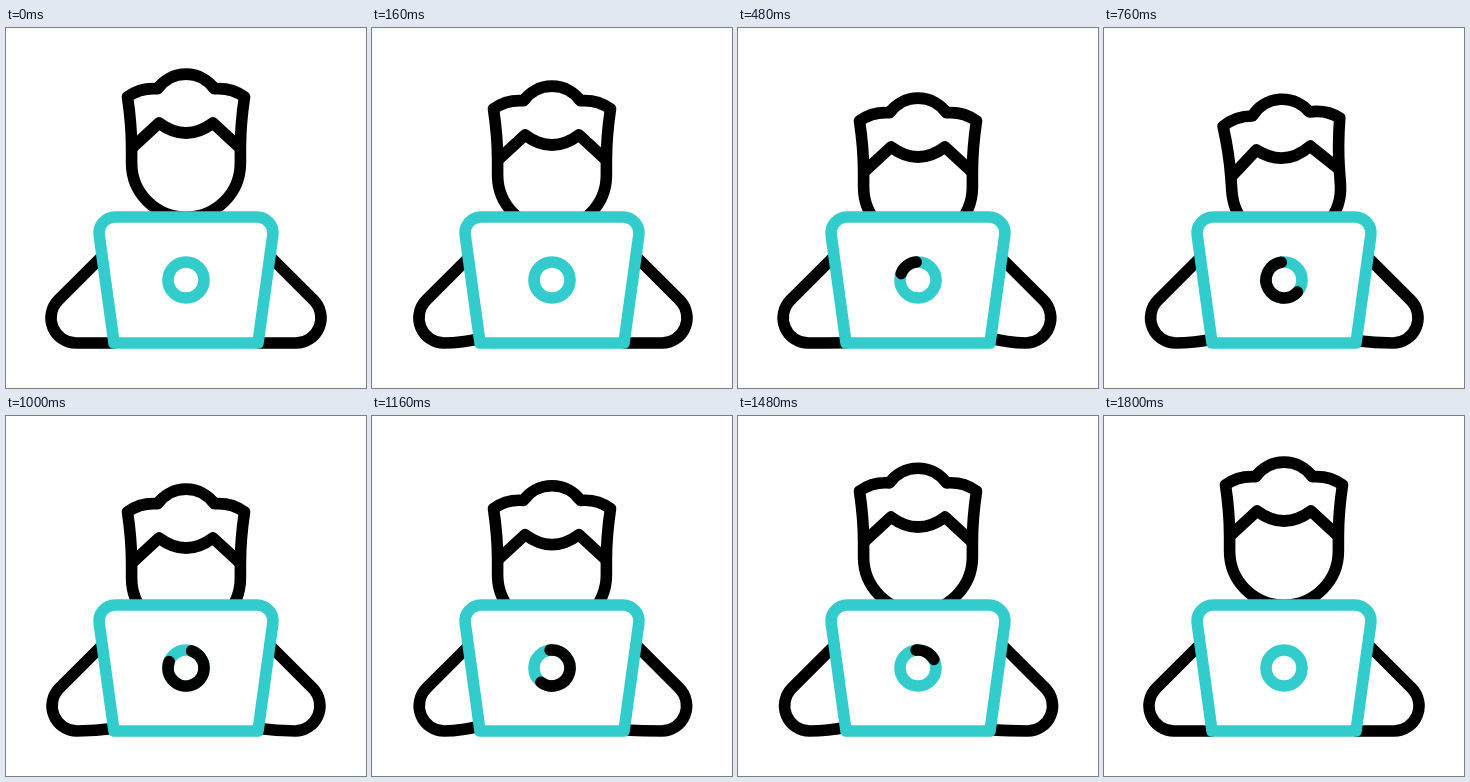
Animation, 360 px wide and 360 px high, one loop 2 s. Source, as an HTML page:

```html
<!DOCTYPE html>
<html lang="en">
<head>
<meta charset="utf-8">
<title>Person at laptop</title>
<style>
  html, body { margin: 0; width: 100%; height: 100%; overflow: hidden; background: #fff; }
  svg { display: block; width: 100%; height: 100%; }
</style>
</head>
<body>
<svg viewBox="0 0 360 360" fill="none" stroke="#000" stroke-width="11.6" stroke-linecap="round" stroke-linejoin="round">
  <path id="leftArm"/>
  <path id="rightArm" transform="translate(360 0) scale(-1 1)"/>
  <g id="head">
    <path d="M121.500 69C131 62 141 60 151.500 60.800A35 35 0 0 1 208.500 60.800C219 60 229 62 238.500 69C236 86 234.400 103 234.400 120V135A54.400 54.400 0 0 1 125.600 135V120C125.600 103 124 86 121.500 69Z"/>
    <path d="M127 119L153 95Q180 115 207 95L233 119"/>
  </g>
  <g stroke="#33cccc">
    <path fill="#fff" d="M108 315L93.200 207.200A16 16 0 0 1 109 189H251A16 16 0 0 1 266.800 207.200L252 315Z"/>
    <circle cx="180" cy="252" r="18"/>
  </g>
  <path id="arc"/>
</svg>
<script>
const LOOP = 2000, STEP = 40, END = 1800;
const part = id => document.getElementById(id);
const head = part('head'), leftArm = part('leftArm'), rightArm = part('rightArm'), arc = part('arc');

const progress = (t, start, length) => Math.min(1, Math.max(0, (t - start) / length));
const ease = u => (1 - Math.cos(Math.PI * u)) / 2;
const easeOut = u => Math.sin(Math.PI * u / 2);
const humps = (t, start, length, count) =>
  Math.sin(Math.PI * count * progress(t, start, length * count)) ** 2;

// Bending pulls the elbow inwards and lifts the hand behind the laptop.
function bendArm(arm, bend) {
  const x = 2.4 * bend, hand = 315 - 6 * bend;
  arm.setAttribute('d', `M${108 + x} ${hand}Q${88 + x} 315 ${70 + x} 315` +
    `A25.1 25.1 0 0 1 ${52.3 + x} 272.2L${94 + x} 230.5`);
}

// Angle in degrees, counterclockwise from the top of the ring.
function ringPoint(angle) {
  const a = angle * Math.PI / 180;
  return `${180 - 18 * Math.sin(a)} ${252 - 18 * Math.cos(a)}`;
}

function drawArc(tail, tip) {
  arc.style.display = tip - tail > 0.5 ? '' : 'none';
  const middle = ringPoint((tail + tip) / 2);
  arc.setAttribute('d', `M${ringPoint(tail)}A18 18 0 0 0 ${middle}A18 18 0 0 0 ${ringPoint(tip)}`);
}

function render(t) {
  const drop = 24 * easeOut(progress(t, 0, 480))
    + 3 * ease(progress(t, 600, 400))
    - 27 * ease(progress(t, 1000, 700));
  const tilt = -4.2 * humps(t, 500, 480, 1);
  head.setAttribute('transform', `translate(0 ${drop}) rotate(${tilt} 180 105)`);
  bendArm(leftArm, humps(t, 0, 448, 4));
  bendArm(rightArm, humps(t, 222, 440, 3));
  drawArc(6 + 360 * ease(progress(t, 700, 1090)), 6 + 360 * ease(progress(t, 225, 930)));
}

const origin = performance.now();
function tick() {
  const t = (performance.now() - origin) % LOOP;
  const stepped = Math.min(END, Math.floor(t / STEP) * STEP);
  render(stepped < 2 * STEP ? 0 : stepped);
  requestAnimationFrame(tick);
}
tick();
</script>
</body>
</html>
```
